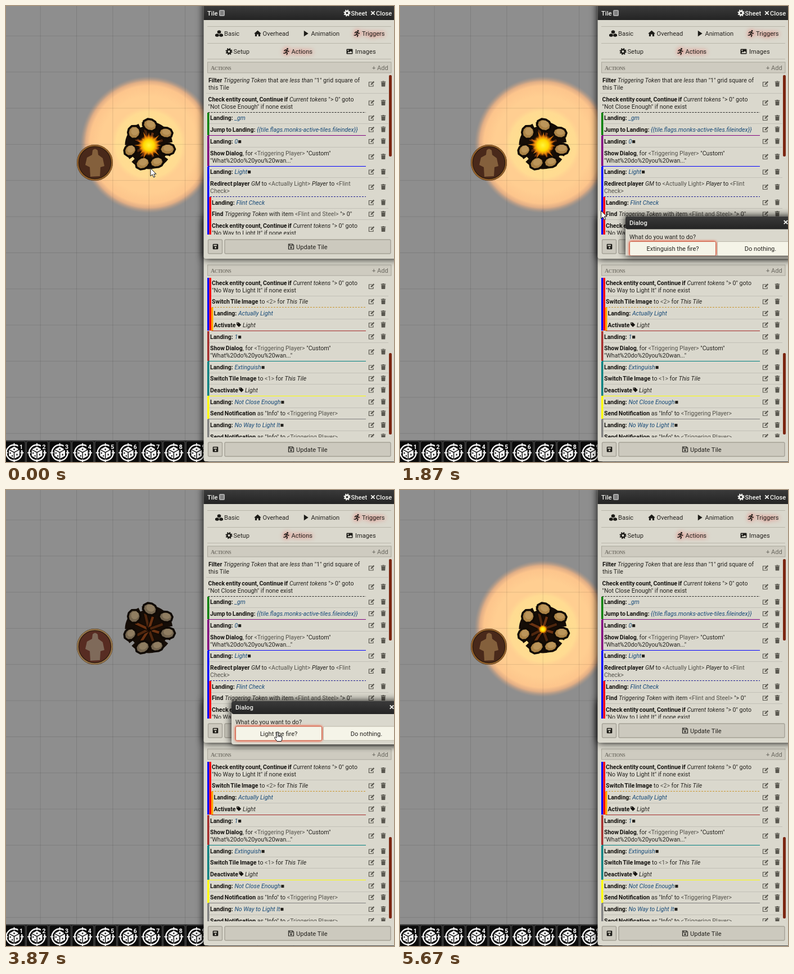
Write an HTML page that moves like this. It is 690 px wide and 812 px high and loops after 5.74 s.

```html
<!DOCTYPE html>
<html lang="en">
<head>
<meta charset="utf-8">
<title>Campfire tile</title>
<style>
html, body { margin: 0; width: 100%; height: 100%; overflow: hidden; background: #8e8e8e; }
svg { display: block; }
text { font: 10.6px Roboto, "Open Sans", sans-serif; fill: #24221e; }
.b { font-weight: 700; font-size: 10.5px; word-spacing: -.8px; fill: #151310; }
.i { font-style: italic; }
.l { font-style: italic; fill: #174a78; }
.g { fill: #53514a; }
.s { font: 14.5px "DejaVu Sans", sans-serif; fill: #111; }
.ui { font-size: 11.1px; }
.head { font-size: 11.2px; font-weight: 500; fill: #f2f2ee; }
.cap { font: bold 10px "Liberation Serif", serif; letter-spacing: -.4px; fill: #77746a; }
.hot { filter: drop-shadow(0 0 4px #f00b); }
.win { filter: drop-shadow(0 0 7px #000); }
</style>
</head>
<body>
<svg id="stage" width="690" height="812" viewBox="0 0 690 812"></svg>
<script>
const LOOP = 5740, stage = document.getElementById('stage');

const rect = (x, y, w, h, fill, more = '') =>
  `<rect x="${x}" y="${y}" width="${w}" height="${h}" fill="${fill}" ${more}/>`;
const line = (x1, y, x2, color, dash = '') =>
  `<path d="M${x1} ${y}H${x2}" stroke="${color}" stroke-dasharray="${dash}"/>`;
const icon = (id, x, y, color = '#1d1c18') => `<use href="#${id}" x="${x}" y="${y}" color="${color}"/>`;

// Marks: *bold* ~italic~ ^link^ |grey|
const marks = { '*': 'b', '~': 'i', '^': 'l', '|': 'g', '■': 's' };
function format(s) {
  s = s.replace(/</g, '&lt;').replace('■', '■■■');
  for (const m in marks)
    s = s.replace(RegExp(`\\${m}(.*?)\\${m}`, 'g'), (_, t) => `<tspan class="${marks[m]}">${t}</tspan>`);
  return s;
}
// y is the middle of the line of capitals
const text = (x, y, s, cls = '', more = '') =>
  `<text x="${x}" y="${y + 4}" class="${cls}" ${more}>${format(s)}</text>`;

const defs = `<defs>
<radialGradient id="halo">
  <stop offset=".7" stop-color="#ffce91"/><stop offset=".86" stop-color="#fdc58c"/>
  <stop offset=".92" stop-color="#f0b484" stop-opacity=".85"/><stop offset="1" stop-color="#b89a84" stop-opacity="0"/>
</radialGradient>
<radialGradient id="core">
  <stop offset=".5" stop-color="#ffdf90"/><stop offset=".86" stop-color="#ffdb92"/><stop offset="1" stop-color="#ffd592" stop-opacity="0"/>
</radialGradient>
<radialGradient id="blaze">
  <stop offset="0" stop-color="#fff43a"/><stop offset=".5" stop-color="#ffd800"/>
  <stop offset=".75" stop-color="#f59a0a" stop-opacity=".8"/><stop offset="1" stop-color="#c84e00" stop-opacity="0"/>
</radialGradient>
<linearGradient id="bar" x2="0" y2="1"><stop stop-color="#3a3a3a"/><stop offset="1" stop-color="#242424"/></linearGradient>
<g id="edit" fill="none" stroke="currentColor" stroke-width="1.2">
  <path d="M1-3H-4.5V4.5H3V1"/><path d="M-1 1.5L4.3-3.8" stroke-width="2.4"/></g>
<g id="trash" fill="currentColor"><path d="M-4.2-4.3h2.4l.6-.8h2.4l.6.8h2.4v1.2h-8.4zM-3.6-2.5h7.2l-.4 7.4h-6.4z"/></g>
<g id="gear" fill="none" stroke="currentColor"><circle r="3.3" stroke-width="2.6"/>
  <circle r="5" stroke-width="2.2" stroke-dasharray="2 1.93"/></g>
<g id="cross" stroke="currentColor" stroke-width="1.9"><path d="M-3.2-3.2L3.2 3.2M3.2-3.2L-3.2 3.2"/></g>
<g id="scroll"><rect x="-5" y="-5.5" width="10" height="11" rx="2" fill="#aaa"/>
  <path d="M-3-2.5H3M-3 0H3M-3 2.5H3" stroke="#444"/></g>
<g id="cubes" fill="currentColor"><path d="M0-6l3.2 1.5v3.6L0 .5l-3.2-1.4v-3.6zM-3.6 0L-.3 1.5V4.7L-3.6 6-7 4.7V1.5zM3.6 0L7 1.5V4.7L3.6 6 .3 4.7V1.5z"/></g>
<g id="house" fill="currentColor"><path d="M0-5.5L6.5 .3H4.6V5H1.4V1.5h-2.8V5h-3.2V.3h-1.9z"/></g>
<g id="play" fill="currentColor"><path d="M-3.7-5.3L4.2 0l-7.9 5.3z"/></g>
<g id="run" fill="none" stroke="currentColor" stroke-width="1.7" stroke-linecap="round" stroke-linejoin="round">
  <circle cx="2" cy="-4.8" r=".7"/><path d="M-3.6-1.2L-1.6-2.9 1-2.4-.8 1 1.8 2.6.8 5.4M1-2.4L2.4-.4H4.3M-1.2 1.7L-2.2 3H-4.6"/></g>
<g id="image"><rect x="-5.5" y="-4.5" width="11" height="9" rx="1.2" fill="currentColor"/>
  <circle cx="-2.6" cy="-1.8" r="1.1" fill="#dad8cd"/><path d="M-4 3L-1.5.3 0 1.6 2.2-1 4.2 1.5V3z" fill="#dad8cd"/></g>
<g id="disk"><rect x="-4.8" y="-4.8" width="9.6" height="9.6" rx="1.2" fill="currentColor"/>
  <path d="M-3.2-3.2H2.4V-1H-3.2z" fill="#cfccbf"/><circle cy="1.7" r="1.5" fill="#cfccbf"/></g>
<g id="floppy" fill="none" stroke="currentColor" stroke-width="1.2"><path d="M-4.5-4.5H2.6L4.5-2.6V4.5H-4.5z"/>
  <path d="M-2.5-4.3V-1.5H2V-4.3"/><circle cy="1.6" r="1.1"/></g>
<g id="tag"><path d="M-4-4H0L4.2.2.2 4.2-4 0z" fill="#151310"/><circle cx="-2.2" cy="-2.2" r=".8" fill="#dad8cd"/></g>
<g id="target" fill="none" stroke="#f4f4f4"><circle r="14" stroke-width="2.4"/>
  <path d="M0-17V-11M0 17V11M-17 0H-11M17 0H11" stroke-width="2"/>
  <path d="M0-11.5L10-6V6L0 11.5-10 6V-6z" fill="#f4f4f4" stroke="#0b0b0b" stroke-width="1.2"/>
  <path d="M-10-6L0-.6 10-6M0-.6V11" stroke="#0b0b0b" stroke-width="1.4"/>
  <path d="M-1.3-6h2.6M-6.8-.6v2.4M-3.4 4.4v2.4M5 2v2.8" stroke="#0b0b0b" stroke-width="2"/></g>
</defs>`;

function map() {
  let grid = '', slots = '';
  for (let k = 0; k < 12; k++) grid += `M0 ${53.3 + k * 64.35}H352M${61.2 + k * 64.35} 0V812`;
  for (let k = 0; k < 9; k++) {
    const x = -4 + k * 40.55;
    slots += rect(x, 775, 38.2, 40, '#0b0b0b', 'rx="3" stroke="#4a4a4a"') + icon('target', x + 18.5, 795.5) +
      rect(x + 25.5, 778, 11.5, 13, '#0b0b0b') +
      text(x + 28, 785, '' + (k + 1), '', 'style="font-size:10.5px;font-weight:700;fill:#fff"');
  }
  return rect(0, 0, 690, 812, '#8e8e8e') +
    `<g id="glow"><circle cx="254" cy="247" r="122" fill="url(#halo)"/>
     <circle id="inner" cx="254" cy="247" r="68" fill="url(#core)"/></g>
     <path d="${grid}" stroke="#000" stroke-opacity=".11" fill="none"/>` +
    token() + pit() + rect(0, 773.5, 360, 40, '#262626') + slots;
}

const token = () => `<g transform="translate(158 279)">
  <circle r="30" id="disc" stroke="#2b190c" stroke-width="4"/>
  <circle r="30.5" id="ring" fill="none" stroke-width="2.6"/>
  <path id="figure" d="M-4-22Q0-27 5-22L6-14 14-8 17 6 10 8 9 24-8 25-9 8-17 4-14-9-5-14z"/></g>`;

function pit() {
  const stones = [[2, -36, 13], [30, -22, 12], [33, 7, 13], [14, 30, 12], [-11, 32, 13], [-33, 9, 12], [-26, -23, 13]];
  const rock = ([x, y, r], n, k) => {
    let pts = '';
    for (let j = 0; j < 10; j++) {
      const a = j * Math.PI / 5, q = r * k * (.95 + .09 * Math.sin(n * 7 + j * 1.3));
      pts += `${x + q * Math.cos(a)},${y + q * Math.sin(a) * .9} `;
    }
    return pts;
  };
  let rocks = '', logs = '', spikes = '';
  stones.forEach((s, n) => {
    rocks += `<polygon points="${rock(s, n, 1)}" fill="currentColor" stroke="#100a05" stroke-width="3.6" stroke-linejoin="round"/>
      <polygon points="${rock([s[0] + 1, s[1] - 2, s[2]], n, .6)}" fill="#ffe3a8" opacity=".2"/>`;
  });
  for (let k = 0; k < 8; k++)
    logs += rect(2, -3, 22 + k % 3 * 3, 6, k % 2 ? '#4e260e' : '#6a3212',
      `stroke="#140a04" stroke-width="1.6" transform="rotate(${k * 45 + 18 + k % 3 * 7})"`);
  for (let k = 0; k < 32; k++) {
    const r = k % 2 ? 12 : 22 + 5 * Math.sin(k * 2.1), a = k * Math.PI / 16;
    spikes += `${r * Math.cos(a)},${r * Math.sin(a)} `;
  }
  return `<g transform="translate(254 248)" id="pit">
    <circle r="35" fill="#150d07" stroke="#150d07" stroke-width="15" stroke-dasharray="17 5"/>
    <circle r="26" fill="#170d06"/>${logs}${rocks}
    <g id="fire"><polygon points="${spikes}" fill="#e57a0c" opacity=".9"/><circle r="19" fill="url(#blaze)"/></g></g>`;
}

// Rows: middle of first line, x, lower border colour (d = dashed), text, optional second line
const faint = '#0000001c';
const notify = '*Send Notification* as "Info" to |<Triggering Player>|';
const wan = '"What%20do%20you%20wan..."', ask = '*Show Dialog*, for |<Triggering Player>| "Custom"';
const count = '*Check entity count, Continue if* ~Current tokens~ "> 0" goto';
const noWay = '"No Way to Light It" if none exist';
const upper = [
  [132, 360, faint, '*Filter* ~Triggering Token~ that are ~less than~ "1" grid square of', 'this Tile'],
  [165.5, 359.5, 'd#222', count, '"Not Close Enough" if none exist'],
  [199, 363, faint, '*Landing:* ^_gm^'],
  [219.5, 363, '#800080', '*Jump to Landing:* ^{{tile.flags.monks-active-tiles.fileindex}}^'],
  [240.5, 363, faint, '*Landing:* ^0^■'],
  [261.5, 363, '#0000ff', ask, wan],
  [295, 363, faint, '*Landing:* ^Light^■'],
  [315.5, 363, 'd#1a1a90', '*Redirect player* ~GM~ to |<Actually Light>| ~Player~ to |<Flint|', '|Check>|'],
  [349.5, 366, faint, '*Landing:* ^Flint Check^'],
  [370, 366, faint, '*Find* ~Triggering Token~ with item |<Flint and Steel>| "> 0"'],
  [390.5, 366, faint, count, noWay]];
const lower = [
  [492.5, 366, faint, count, noWay],
  [526, 366, 'd#c9962f', '*Switch Tile Image* to |<2>| for ~This Tile~'],
  [547, 369.5, faint, '*Landing:* ^Actually Light^'],
  [567.5, 369.5, '#a52a2a', '*Activate*'],
  [588.5, 363, faint, '*Landing:* ^1^■'],
  [609, 363, '#008080', ask, wan],
  [643, 363, faint, '*Landing:* ^Extinguish^■'],
  [663, 363, faint, '*Switch Tile Image* to |<1>| for ~This Tile~'],
  [683.5, 363, '#ffff00', '*Deactivate*'],
  [704.5, 363, faint, '*Landing:* ^Not Close Enough^■'],
  [725, 363, '#808080', notify],
  [746, 363, faint, '*Landing:* ^No Way to Light It^■'],
  [766.5, 363, faint, notify]];

// Bars: x, top, bottom, colour
const upperBars = [[358, 190, 230, '#008000'], [358, 231, 285, '#800080'], [358, 286, 410, '#0000ff'], [361.5, 340, 410, '#ff0000']];
const lowerBars = [[358, 484, 578, '#0000ff'], [361.5, 484, 578, '#ff0000'], [365, 537, 578, '#ffa500'], [358, 579, 632, '#a52a2a'],
  [358, 633, 694, '#008080'], [358, 695, 735, '#ffff00'], [358, 736, 770, '#808080']];

function list(top, bottom, rows, bars, extra = '') {
  let s = '';
  for (const [y, x, edge, a, b] of rows) {
    const mid = b ? y + 6.5 : y, end = Math.floor(y + (b ? 23.5 : 10.5)) + .5;
    s += text(x, y, a) + (b ? text(x, y + 13, b) : '') + icon('edit', 650, mid, '#5a5850') + icon('trash', 671, mid, '#5a5850');
    s += edge[0] == 'd' ? line(x, end, 640, edge.slice(1), '3 2') : line(x - 4, end, edge == faint ? 680 : 640, edge);
  }
  for (const [x, y, y2, c] of bars) s += rect(x, y, 3.4, y2 - y, c);
  const h = bottom - top;
  return `<svg x="0" y="${top}" width="690" height="${h}" viewBox="0 ${top} 690 ${h}">${s}${extra}</svg>`;
}

const button = (x, y, w) => rect(x, y, w, 25, '#ccc9be', 'rx="2" stroke="#a5a297" stroke-width="1.4"');
const footer = y => button(359.5, y, 25) + icon('disk', 372.5, y + 12.5) + button(389, y, 295) +
  icon('floppy', 507, y + 12.5) + text(516, y + 12.5, 'Update Tile', 'ui');
const caption = y => rect(358.5, y, 326.5, 19, '#cecbc0', 'stroke="#aaa79c"') +
  `<text x="364" y="${y + 13.5}" class="cap">A<tspan font-size="8.3">CTIONS</tspan></text>` +
  text(651, y + 9.5, '+ Add', 'ui', 'style="fill:#6b6960"');
const thumb = y => rect(681, y, 5, 145, '#7c2712', 'rx="2"');
const tab = (x, y, id, label, gap = 9) => icon(id, x, y) + text(x + gap, y, label, 'ui');

const panels = () =>
  rect(351.5, 375, 350, 436, '#dad8cd', 'class="win" rx="4"') + caption(461) +
  list(484, 768, lower, lowerBars, icon('tag', 414, 567.5) + text(421, 567.5, '~Light~') +
    icon('tag', 418.5, 683.5) + text(425, 683.5, '~Light~')) +
  thumb(618) + footer(777) +
  rect(351.5, -8, 350, 458, '#dad8cd', 'class="win" rx="4"') + rect(351.5, 0, 339, 25, 'url(#bar)') +
  text(358, 12.5, 'Tile', 'head') + icon('scroll', 384, 12.5) + icon('gear', 606.5, 12.5, '#f2f2ee') +
  text(613.5, 12.5, 'Sheet', 'head') + icon('cross', 652.5, 12.5, '#f2f2ee') + text(658, 12.5, 'Close', 'head') +
  [36.5, 66.5, 94.5].map(y => line(358, y, 685, '#b9b6aa')).join('') +
  tab(379, 49, 'cubes', 'Basic') + tab(447.5, 49, 'house', 'Overhead') + tab(533.5, 49, 'play', 'Animation') +
  tab(396.5, 81, 'gear', 'Setup', 8) + tab(611, 81, 'image', 'Images', 10) +
  `<g class="hot">${tab(624, 49, 'run', 'Triggers')}${tab(498.5, 81, 'run', 'Actions')}</g>` +
  caption(100) + list(123, 407, upper, upperBars) + thumb(123) + footer(416);

const dialog = () => `<clipPath id="shutter"><rect id="gate" x="380" y="376" width="330"/></clipPath>
  <g id="dialog" class="win"><g clip-path="url(#shutter)">
  ${rect(401, 376, 310, 77, '#dad8cd', 'rx="4"')}${rect(401, 376, 310, 23, 'url(#bar)', 'rx="4"')}
  ${text(408, 387, 'Dialog', 'head')}${icon('cross', 686, 386.5, '#f2f2ee')}
  ${text(408, 412.5, 'What do you want to do?', '', 'style="font-size:10.8px"')}
  <g style="filter:drop-shadow(0 0 2px #f20)">${rect(408.5, 421, 153, 25, '#f5f4e8', 'rx="2" stroke="#c8674f"')}</g>
  ${rect(564.5, 421, 153, 25, '#f5f4e8', 'rx="2" stroke="#bbb8aa"')}
  <text id="answer" class="ui" x="485" y="437.5" text-anchor="middle"></text>
  <text class="ui" x="641" y="437.5" text-anchor="middle">Do nothing.</text></g></g>`;

const pointer = `<g id="pointer" fill="#fff" stroke="#111" stroke-linejoin="round">
  <path id="arrow" d="M0 0V14L3.3 11 5.6 16 8 15 5.8 10.2H10z"/>
  <path id="hand" d="M-1 1Q.5-1 2 1V6L7 7Q9 7.5 9 10V13L7.5 16.5H0L-4.5 10.5Q-4.5 8.5-2.5 9L-1 10.5zM2 6v3M4.5 7v2M7 7.5v2"/></g>`;

stage.innerHTML = defs + map() + panels() + dialog() + pointer;
const el = id => document.getElementById(id);
const set = (id, attrs) => { for (const k in attrs) el(id).setAttribute(k, attrs[k]); };
const ramp = (t, a, b) => Math.min(1, Math.max(0, (t - a) / (b - a)));

// Pointer stops: time, x, y
const path = [[0, 257, 289], [300, 258, 283], [600, 257, 275], [870, 256, 268], [1200, 432, 408], [1330, 485, 431],
  [1660, 485, 431], [1870, 358, 365], [2130, 264, 288], [2330, 241, 269], [2640, 241, 269], [3130, 472, 448],
  [3270, 482, 431], [3920, 482, 431], [4330, 102, 723], [4400, 83, 741], [4670, 36, 815], [LOOP, 36, 830]];

function draw(t) {
  const k = path.findIndex(p => p[0] > t), [t0, x0, y0] = path[k - 1], [t1, x1, y1] = path[k];
  const f = (t - t0) / (t1 - t0);
  const hand = t > 1290 && t < 1690 || t > 3220 && t < 3960;
  set('pointer', { transform: `translate(${x0 + (x1 - x0) * f} ${y0 + (y1 - y0) * f})` });
  set('arrow', { visibility: hand ? 'hidden' : 'visible' });
  set('hand', { visibility: hand ? 'visible' : 'hidden' });

  const second = t > 2300;
  const shut = second ? ramp(t, 3900, 4100) : ramp(t, 1830, 2040);
  const shown = second ? ramp(t, 2580, 2780) : ramp(t, 800, 1000);
  const swing = x => .5 - Math.cos(x * Math.PI) / 2;
  set('dialog', { opacity: shut == 1 ? 0 : swing(shown), transform: `translate(0 ${shut ? -1.5 : 0})` });
  set('gate', { height: 77 * (1 - swing(shut)) });
  el('answer').textContent = second ? 'Light the fire?' : 'Extinguish the fire?';

  const blazing = t < 2120, lit = blazing || t > 4180;
  const flicker = Math.sin(t / 90) * .6 + Math.sin(t / 37) * .4;
  set('glow', { opacity: blazing ? 1 : ramp(t, 4150, 4330) });
  set('inner', { opacity: blazing ? 1 : ramp(t, 4330, 4900), r: 68 + flicker });
  const size = blazing ? 1 + flicker * .05 : .25 + .15 * ramp(t, 4200, LOOP);
  set('fire', { transform: `rotate(${flicker * 5}) scale(${size})`, opacity: lit ? 1 : 0 });
  set('pit', { color: lit ? '#aa8246' : '#74654f' });
  set('disc', { fill: lit ? '#49291a' : '#572c22' });
  set('ring', { stroke: lit ? '#92612c' : '#95754a' });
  set('figure', { fill: lit ? '#84603c' : '#7f6a5a' });
}

function tick() {
  draw(performance.now() % LOOP);
  requestAnimationFrame(tick);
}
tick();
</script>
</body>
</html>
```
